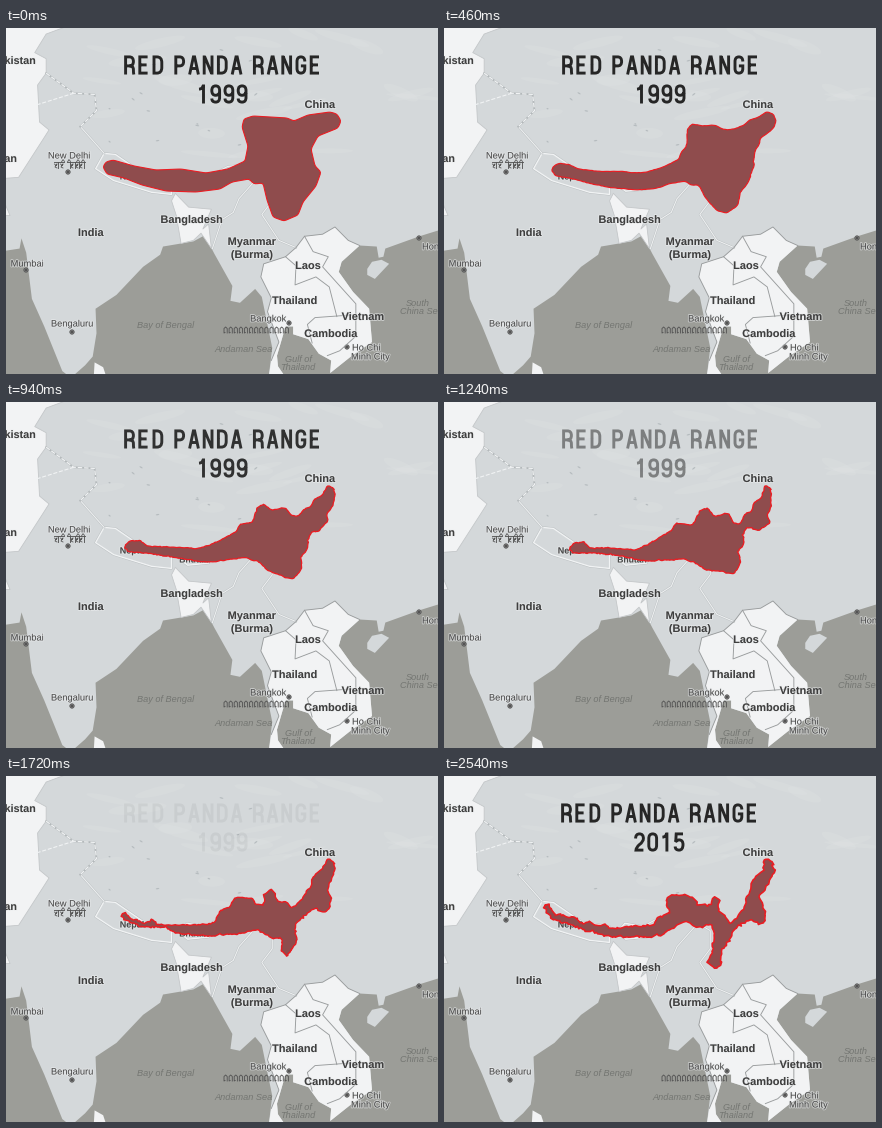
Write a matplotlib script that moves like this. It is 432 px wide and 346 px high and loops after 3420 ms.

```python
import numpy as np
import matplotlib.pyplot as plt
import matplotlib.patheffects as pe
from matplotlib.animation import FuncAnimation
from matplotlib.patches import Circle, Ellipse, PathPatch, Polygon
from matplotlib.path import Path

W, H, DPI = 432, 346, 100
PT = 72 / DPI
STEP, LOOP, MORPH_END = 20, 3420, 2540

SEA, LAND, PALE = "#9c9d98", "#d4d8da", "#f2f3f4"
INK, FILL, EDGE = "#262626", "#8f4c4d", "#ea1c22"

rng = np.random.default_rng(4)
fig = plt.figure(figsize=(W / DPI, H / DPI), dpi=DPI, facecolor=SEA)
ax = fig.add_axes([0, 0, 1, 1])
ax.set_xlim(0, W)
ax.set_ylim(H, 0)
ax.axis("off")


# ---------- map ----------
def project(points):
    """Mercator projection from lon/lat to stage pixels."""
    lon, lat = np.array(points, float).T
    merc = np.degrees(np.log(np.tan(np.pi / 4 + np.radians(lat) / 2)))
    return np.column_stack([62 + 9.5 * (lon - 77.2), 143 + 9.52 * (29.85 - merc)])


def region(points, color, edge="none", width=0.0):
    ax.add_patch(Polygon(project(points), fc=color, ec=edge, lw=width * PT,
                         joinstyle="round"))


def border(points, color, width=1.0, style="-"):
    x, y = project(points).T
    ax.plot(x, y, style, color=color, lw=width * PT, solid_joinstyle="round")


china_coast = [(117, 23.2), (114.2, 22.4), (110.6, 21.2), (110.4, 20.4),
               (109.9, 20.3), (109.7, 21.4)]
indochina_coast = [
    (107.9, 21.5), (106, 19.9), (105.7, 18.9), (107.2, 16.9), (108.9, 15.2),
    (109.2, 11.8), (107.1, 10.4), (104.8, 8.6), (104.9, 9.9), (103.6, 10.6),
    (102.5, 12.1), (100.9, 12.6), (100.9, 13.4), (100.1, 13.4), (99.2, 10.4),
    (99.3, 9.3), (100.2, 8)]
burma_coast = [
    (98.3, 8), (98.7, 11.2), (97.6, 16.4), (96.9, 17.2), (95.3, 15.8), (94.3, 16),
    (94.5, 17.5), (92.6, 20.7), (91.6, 22.5), (90.4, 21.9)]
india_coast = [
    (87.2, 21.4), (86.9, 20.6), (85.1, 19.4), (82.3, 16.6), (80.1, 15.2),
    (80.2, 12.7), (79.8, 10.3), (79, 9.4), (77.5, 8.1), (76.6, 8.8), (74.7, 13.4),
    (73.4, 16.2), (72.8, 20.8), (72.3, 22.2), (72.1, 21.2), (70, 20.9)]
hainan = [(108.7, 19.2), (109.2, 19.9), (110.2, 20.1), (111, 19.7), (109.5, 18.2),
          (108.7, 18.6)]
northwest = [
    (70, 24.4), (71.1, 24.4), (70.1, 26.5), (70.5, 27.9), (72, 28), (74.6, 31.5),
    (75.2, 32.3), (74.2, 33), (74, 36.2), (74.9, 37.2), (74.9, 38.4), (73.7, 38.9),
    (74.9, 40.4), (77.4, 41.1), (77.8, 42), (70, 42)]
bangladesh = [
    (88.1, 25.8), (88.5, 26.5), (89.9, 25.2), (92.3, 25), (91.4, 23.1), (92, 23.6),
    (92.3, 21.2), (91.2, 22.7), (90.4, 22), (89.1, 21.7), (88.6, 24.4)]
thai_west = [(98.6, 9.9), (99.4, 11.8), (98.2, 14.9), (98.6, 16.3), (97.5, 18.4),
             (97.8, 19.7), (100.1, 20.4)]
laos_north = [(101.2, 21.3), (102.1, 22.4), (104, 22.6), (105.3, 23.3), (106.7, 22)]
nepal = [(80.1, 28.8), (81, 30.2), (82.2, 30.1), (85.2, 28.3), (88.1, 27.9),
         (88.1, 26.4), (86, 26.6), (82, 27.7)]
bhutan = [(88.9, 27.3), (89.7, 28.2), (91.6, 27.9), (92, 26.9), (89.8, 26.7)]

region([(70, 43), (117, 43)] + china_coast + indochina_coast + burma_coast
       + india_coast, LAND)
region(hainan, LAND)
region([(79.9, 8), (80, 9.7), (80.9, 9.2), (81.3, 8)], PALE)

# faint relief and lakes of the plateau
for _ in range(26):
    ax.add_patch(Ellipse((rng.uniform(70, 430), rng.uniform(5, 130)),
                         rng.uniform(20, 60), rng.uniform(4, 12),
                         angle=rng.uniform(-25, 25), fc="#e1e4e5", alpha=0.25))
for _ in range(14):
    ax.add_patch(Ellipse((rng.uniform(90, 250), rng.uniform(15, 120)),
                         rng.uniform(2, 4), 1.3, angle=rng.uniform(-40, 40),
                         fc="#b6bcbf"))

region(northwest, PALE, "#c3c6c8", 0.8)
region(bangladesh, PALE, "#c3c6c8", 0.8)
region(thai_west + laos_north + indochina_coast + burma_coast[:1], PALE)
for shape in (nepal, bhutan):
    region(shape, LAND, "#b9bec0", 2.2)
    region(shape, LAND, "#f1f3f4", 1.3)

east_himalaya = [(91.6, 27.9), (94, 29), (96, 29.2), (97.4, 28.2)]
burma_west = [(97.4, 28.2), (95.2, 26), (94.6, 24.7), (93.4, 24), (92.4, 21.2)]
burma_east = [(97.4, 28.2), (98.7, 27.5), (98.7, 25.8), (97.6, 24.5), (99.4, 22),
              (101.2, 21.3)]
for line in (east_himalaya, burma_west, burma_east, [(81, 30.2), (78.5, 32.6)]):
    border(line, "#b9bec0", 1.9)
    border(line, "#eef0f1", 1.1)
kashmir = [(74.9, 37.2), (77.8, 35.5), (80, 35.4), (80.2, 34), (78.5, 32.6)]
border(kashmir, "#b4b9bb", 1.8)
border(kashmir, "#f1f3f4", 1.2, "--")
border([(73.9, 34.5), (77.8, 35.5)], "#f1f3f4", 1.1, "--")

thai_laos = [(100.1, 20.4), (101.2, 19.5), (101.1, 17.6), (103.3, 18.4),
             (104.7, 17.4), (105.5, 14.4)]
viet_west = [(102.1, 22.4), (103, 20.9), (104.6, 20.4), (104, 19.4), (107.5, 15.7),
             (107.5, 12.4), (105.8, 10.9), (104.5, 10.4)]
khmer_north = [(102.9, 11.7), (102.4, 13.6), (103.2, 14.3), (107.5, 14.6)]
for line in (thai_west + laos_north + indochina_coast[:1], thai_laos, viet_west,
             khmer_north):
    border(line, "#989b9c", 0.9)

# ---------- labels ----------
HALO = [pe.withStroke(linewidth=1.3, foreground="#eceeef", alpha=0.6)]


def label(x, y, text, size, color="#4b4b4b", ha="center", halo=True, **kw):
    ax.text(x, y, text, fontsize=size * PT, color=color, ha=ha,
            va="center_baseline", family="Liberation Sans", clip_on=True,
            path_effects=HALO if halo else None, **kw)


for x, y, text in [
        (314, 76, "China"), (85, 204, "India"), (186, 191, "Bangladesh"),
        (246, 213, "Myanmar"), (246, 226, "(Burma)"), (302, 237, "Laos"),
        (289, 272, "Thailand"), (357, 288, "Vietnam"), (325, 305, "Cambodia")]:
    label(x, y, text, 11, "#3f3f3f", weight="bold")
label(30, 32, "Tajikistan", 10.8, "#3f3f3f", "right", weight="bold")
label(11, 130, "Pakistan", 10.8, "#3f3f3f", "right", weight="bold")
label(126, 148, "Nepal", 9, weight="bold")
label(188, 157, "Bhutan", 8.6, weight="bold")

for x, y, text, ha in [
        (63, 127, "New Delhi", "center"), (66, 295, "Bengaluru", "center"),
        (21, 235, "Mumbai", "center"), (262, 290, "Bangkok", "center"),
        (346, 319, "Ho Chi", "left"), (345, 328, "Minh City", "left"),
        (416, 218, "Hong Kong", "left")]:
    label(x, y, text, 9.3, ha=ha)
for x, y, text in [
        (160, 297, "Bay of Bengal"), (238, 320, "Andaman Sea"), (292, 330, "Gulf of"),
        (292, 339, "Thailand"), (412, 274, "South"), (415, 283, "China Sea")]:
    label(x, y, text, 9.1, "#747672", halo=False, style="italic")

for x, y in [(62, 144), (66, 304), (283, 295), (341, 319), (413, 210), (20, 242)]:
    ax.add_patch(Circle((x, y), 2.2, fc="#777", ec="#555", lw=0.5))
    ax.add_patch(Circle((x, y), 0.8, fc="#333"))


def pen(x, y, width=0.9):
    ax.plot(x, y, color="#555", lw=width * PT)


# Devanagari line under New Delhi
pen([48, 58], [134, 134])
pen([61, 79], [134, 134])
for x in (52, 64, 69, 73, 78):
    pen([x, x], [134, 140])
for x in (50, 56, 66, 71, 75):
    pen([x - 1.5, x, x + 1, x - 1, x + 1], [136, 137.5, 136, 139, 140], 0.8)
for x in (57, 63, 72, 77):
    pen([x - 1.5, x, x + 1.5], [134, 131.5, 133.5], 0.8)
# Thai line under Bangkok
for x in np.arange(13) * 5.1 + 218:
    pen([x + 1, x, x, x + 1.6, x + 3.2, x + 3.2], [304.5, 305, 300.5, 299, 300.5, 305])


# ---------- range outline ----------
def resample(points, n):
    p = np.array(points, float)
    s = np.r_[0, np.cumsum(np.hypot(*np.diff(p, axis=0).T))]
    u = np.linspace(0, s[-1], n, endpoint=False)
    return np.column_stack([np.interp(u, s, p[:, 0]), np.interp(u, s, p[:, 1])])


def outline(*sides):
    """Join sides that each start where the one before ended."""
    parts = []
    for k, (side, n) in enumerate(zip(sides, (75, 70, 70, 30, 75))):
        first = sides[k - 1][-1:] if k else []
        last = sides[0][:1] if k == len(sides) - 1 else []
        parts.append(resample(first + side + last, n))
    p = np.vstack(parts)
    return (np.roll(p, 1, 0) + 2 * p + np.roll(p, -1, 0)) / 4


# sides: north edge, crown, east, south lobe, belly
broad = outline(
    [(97, 139), (100, 134), (107, 132), (128, 138), (150, 142), (175, 141), (200, 145),
     (222, 141), (239, 133)],
    [(242, 118), (236, 99), (238, 91), (247, 88), (281, 90), (288, 93), (302, 87),
     (324, 84)],
    [(331, 86), (335, 93), (332, 100), (312, 108), (305, 121), (309, 138), (315, 144),
     (310, 158), (297, 174), (292, 187), (278, 193)],
    [(267, 189), (261, 172), (257, 155), (248, 156), (243, 151)],
    [(226, 154), (214, 161), (190, 164), (160, 163), (136, 157), (118, 150), (101, 146)])
shrunk = outline(
    [(125, 147), (130, 141), (139, 140), (147, 146), (166, 146), (192, 148), (212, 138),
     (228, 128)],
    [(232, 121), (249, 123), (256, 109), (264, 106), (270, 115), (284, 111), (290, 121),
     (297, 122), (301, 111), (308, 110), (310, 101), (317, 97), (321, 83)],
    [(327, 87), (327, 106), (323, 112), (326, 121), (314, 129), (303, 125), (299, 132),
     (300, 142), (294, 149), (297, 160), (290, 172)],
    [(275, 169), (262, 168), (250, 160), (238, 157)],
    [(225, 158), (200, 159), (178, 154), (152, 151), (130, 151)])
forked = outline(
    [(115, 139), (119, 136), (125, 143), (139, 147), (146, 143), (152, 149), (190, 149),
     (208, 147), (215, 134), (224, 131)],
    [(229, 121), (246, 122), (250, 129), (259, 129), (258, 119), (266, 113), (272, 126),
     (281, 126), (286, 132), (296, 124), (300, 115), (306, 111), (306, 103), (316, 93),
     (322, 82)],
    [(329, 88), (328, 98), (321, 113), (325, 121), (323, 134), (316, 137), (308, 132),
     (289, 148), (291, 167), (285, 173), (281, 181)],
    [(275, 172), (276, 161), (268, 163), (250, 153), (240, 157)],
    [(228, 158), (200, 160), (170, 157), (158, 151), (136, 151), (118, 143)])
narrow = outline(
    [(100, 130), (104, 127), (111, 139), (132, 141), (137, 148), (145, 146), (153, 150),
     (160, 148), (167, 153), (190, 150), (211, 149), (212, 143), (227, 136)],
    [(222, 129), (223, 120), (231, 118), (249, 121), (253, 129), (268, 130), (268, 122),
     (275, 123), (274, 133), (287, 148), (301, 132), (301, 124), (307, 116), (308, 106),
     (321, 93), (318, 87), (322, 82)],
    [(328, 86), (331, 95), (322, 112), (315, 119), (322, 140), (320, 148), (313, 149),
     (308, 143), (294, 150), (288, 156), (286, 165), (279, 171), (276, 190), (271, 193)],
    [(264, 186), (270, 168), (271, 155), (266, 147), (258, 152), (240, 146)],
    [(228, 152), (216, 160), (190, 161), (163, 160), (140, 154), (122, 147), (110, 144),
     (103, 136)])

key_times = np.array([0, 1240, 1720, MORPH_END])
key_shapes = np.array([broad, shrunk, forked, narrow])
jag = rng.normal(0, 0.7, broad.shape)


def range_at(t):
    t = min(t, MORPH_END)
    k = min(np.searchsorted(key_times, t, side="right") - 1, len(key_times) - 2)
    u = (t - key_times[k]) / (key_times[k + 1] - key_times[k])
    return (1 - u) * key_shapes[k] + u * key_shapes[k + 1] + jag * t / MORPH_END


habitat = Polygon(range_at(0), fc=FILL, ec=EDGE, lw=1.1 * PT, joinstyle="round", zorder=5)
ax.add_patch(habitat)

# ---------- condensed title lettering ----------
# Strokes hold (x, y) lines and (cx, cy, x, y) curves between shared guides.
L, C, R = 1.6, 5.5, 9.4        # left, centre, right
A, T, U, M, V, B, Z = 0, 1.4, 6, 9.4, 13, 17.6, 19   # heights, top to bottom
bowl = [(L, Z), (L, T), (C, T), (R, T, R, U), (R, M + 1, C, M + 1), (L, M + 1)]
over = [(L, U), (L, T, C, T), (R, T, R, U)]
stem = [(L, Z), (L, A)]
GLYPHS = {
    "E": [[(R, T), (L, T), (L, B), (R, B)], [(L, M), (R - 1, M)]],
    "D": [[(L, M), (L, T), (C - 1, T), (R, T, R, U + 1), (R, V - 1),
           (R, B, C - 1, B), (L, B), (L, M - 0.1)]],
    "P": [bowl],
    "R": [bowl, [(C, M + 1), (R, M + 1, R, V + 1), (R, B, R + 0.4, Z)]],
    "A": [[(L - 0.4, Z), (C - 0.5, T), (C + 0.7, T), (R + 0.6, Z)], [(2.6, V), (8.6, V)]],
    "N": [stem, [(R, A), (R, Z)], [(L + 0.4, 1), (R - 0.4, 18)]],
    "G": [[(R, U), (R, T, C, T), (L, T, L, U), (L, V), (L, B, C, B), (R, B, R, V),
           (R, M + 1), (C, M + 1)]],
    "0": [[(L, M)] + over + [(R, V), (R, B, C, B), (L, B, L, V), (L, M - 0.1)]],
    "1": [[(C + 1, Z), (C + 1, A)], [(2, 4.6), (C, 4.6, C + 0.6, 1)]],
    "2": [over + [(R, M, C, V - 1), (L + 0.4, V + 2, L + 0.4, B), (R, B)]],
    "5": [[(R, T), (L + 1, T), (L + 0.5, M), (C - 2, M - 2, C, M - 2),
           (R, M - 2, R, V - 1), (R, B, C, B), (L, B, L, V + 1)]],
    "9": [[(L, V + 1), (L, B, C, B), (R, B, R, V), (R, U), (R, T, C, T), (L, T, L, U),
           (L, M + 1.4, C, M + 1.4), (R - 1, M + 1.4, R, 8)]]}


def lettering(x0, year):
    verts, codes = [], []
    for text, x, y, advance in (("RED PANDA RANGE", x0, 27.5, 14.2),
                                (year, x0 + 73, 56.5, 13.2)):
        for ch in text:
            for stroke in GLYPHS.get(ch, []):
                for i, seg in enumerate(stroke):
                    pairs = np.reshape(seg, (-1, 2)) + (x, y)
                    verts.extend(pairs)
                    kind = Path.LINETO if i else Path.MOVETO
                    codes += [kind] if len(pairs) == 1 else [Path.CURVE3] * 2
            x += 7.6 if ch == " " else advance
    return ax.add_patch(PathPatch(Path(verts, codes), fc="none", ec=INK, lw=2.9 * PT,
                                  capstyle="butt", joinstyle="miter", zorder=6))


old_title = lettering(118, "1999")
new_title = lettering(117, "2015")


def update(i):
    t = i * STEP
    habitat.set_xy(range_at(t))
    habitat.set_linewidth((1.1 + 0.5 * min(t / MORPH_END, 1)) * PT)
    old_title.set_alpha(np.interp(t, [900, 1240, 1720, 1760], [1, 0.5, 0.06, 0]))
    new_title.set_alpha(np.interp(t, [1760, 2120, MORPH_END], [0, 0.43, 1]))
    return habitat, old_title, new_title


anim = FuncAnimation(fig, update, frames=LOOP // STEP, interval=STEP, repeat=True)
plt.show()
```
